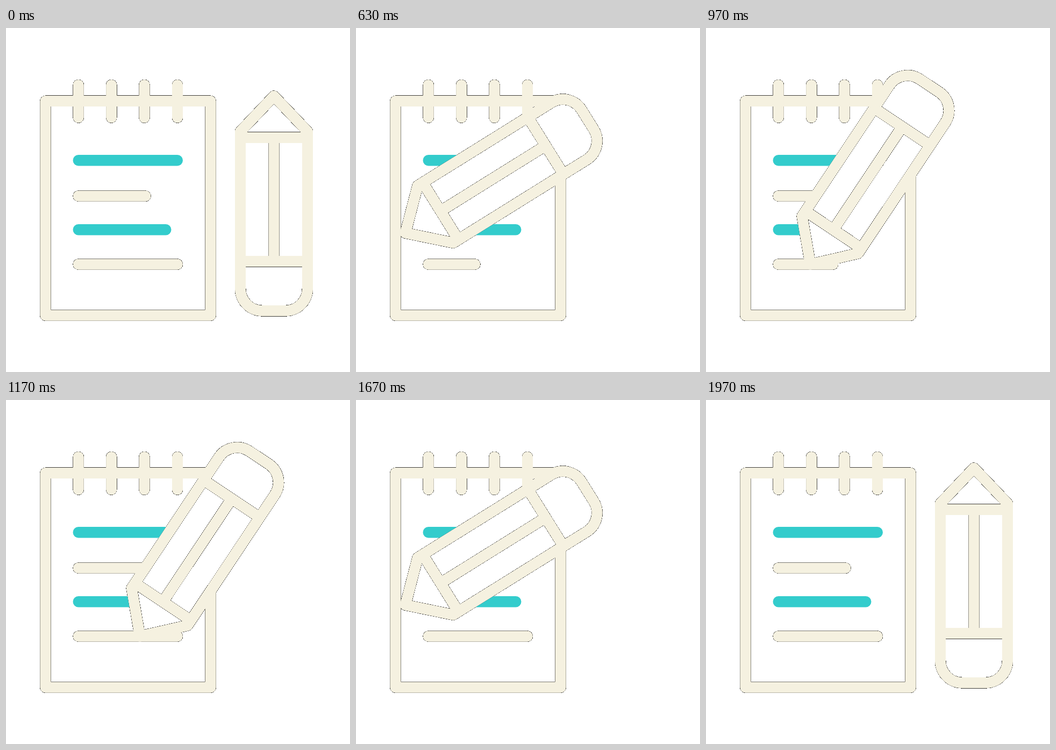
These frames come from a looping animation (640x640 px, 2.5 s). An HTML page:

```html
<!DOCTYPE html>
<html lang="en">
<head>
<meta charset="utf-8">
<title>Notepad and pencil</title>
<style>
  html, body { margin: 0; width: 100%; height: 100%; overflow: hidden; background: #fff; }
  svg { display: block; width: 100vw; height: 100vh; }
</style>
</head>
<body>
<svg viewBox="0 0 640 640" fill="none" stroke-width="20.2" stroke-linecap="round" stroke-linejoin="round">
  <defs>
    <path id="body" d="M-62.5-134 0-199.8 62.5-134V158.6A41 41 0 0 1 21.5 199.6H-21.5A41 41 0 0 1-62.5 158.6Z"/>
    <mask id="behind" maskUnits="userSpaceOnUse" x="0" y="0" width="640" height="640">
      <rect width="640" height="640" fill="#fff"/>
      <use class="pose" href="#body" fill="#000"/>
    </mask>
    <mask id="outside" maskUnits="userSpaceOnUse" x="0" y="0" width="640" height="640">
      <rect width="640" height="640" fill="#fff"/>
      <use class="pose" href="#body" fill="#000" stroke="#000"/>
    </mask>
    <!-- partly covered edge pixels are shown solid, blended with black -->
    <filter id="rim" filterUnits="userSpaceOnUse" x="0" y="0" width="640" height="640" color-interpolation-filters="sRGB">
      <feFlood flood-color="#000" result="black"/>
      <feMerge result="blended">
        <feMergeNode in="black"/>
        <feMergeNode in="SourceGraphic"/>
      </feMerge>
      <feComponentTransfer in="SourceAlpha" result="shape">
        <feFuncA type="discrete" tableValues="0 1 1 1 1 1 1 1"/>
      </feComponentTransfer>
      <feComposite in="blended" in2="shape" operator="in"/>
    </filter>
  </defs>

  <g stroke="#f5f1e0" filter="url(#rim)">
    <g mask="url(#behind)">
      <path d="M73.45 135.9H380.6V534.7H73.45Z"/>
      <path d="M134.7 106V166.5M196.2 106V166.5M257.5 106V166.5M319 106V166.5"/>
      <path d="M134.7 312.7H259.5"/>
      <path id="written"/>
    </g>
    <g class="pose">
      <use href="#body"/>
      <path d="M-62.5-122.7H62.5M-62.5 107.6H62.5M0-122.7V107.6" stroke-linecap="butt"/>
    </g>
  </g>
  <path d="M134.7 246.2H318.8M134.7 375.2H297.3" stroke="#33cccc" stroke-width="20.4" mask="url(#outside)"/>
</svg>
<script>
  const LOOP = 2500;
  const REST = { x: 498.5, y: 326.5 };
  const WRITE = { left: 214, right: 366, y: 273.3, angle: -146.3 };
  const LINE = { x: 134.7, y: 439.7, length: 184.1 };

  // moments in steps of 1/30 s
  const LIFT = 9, TOUCH = 21, TURN = 36, LEAVE = 48.2, LAND = 59;
  const ERASE = 12.5, EMPTY = 25, FULL = 32.5;

  const written = document.getElementById('written');
  const posed = document.querySelectorAll('.pose');

  const progress = (t, from, to) => Math.min(1, Math.max(0, (t - from) / (to - from)));
  const mix = (a, b, p) => a + (b - a) * p;
  const ease = p => p * p * (3 - 2 * p);

  function poseAt(step) {
    // 0 at rest, 1 on the page
    const swing = progress(step, LIFT, TOUCH) - progress(step, LEAVE, LAND);
    // the turn is even; the sideways path starts late, the rise ends early
    const across = swing - swing * (1 - swing) ** 4 / 3;
    const rise = swing + 1.25 * swing ** 3 * (1 - swing);

    const stroke = step < TURN
      ? 1 - (1 - progress(step, TOUCH, TURN)) ** 1.2
      : 1 - progress(step, TURN, LEAVE) ** 1.6;

    return {
      x: mix(REST.x, mix(WRITE.left, WRITE.right, stroke), across),
      y: mix(REST.y, WRITE.y, rise),
      angle: WRITE.angle * swing
    };
  }

  function draw(ms) {
    // whole steps, each starting on a hundredth of a second
    const step = Math.floor((Math.floor(ms / 10) * 3 + 1) / 10);
    const { x, y, angle } = poseAt(step);
    for (const el of posed) el.setAttribute('transform', `translate(${x} ${y}) rotate(${angle})`);

    const shown = 1 - ease(progress(step, ERASE, EMPTY)) + ease(progress(step, EMPTY, FULL));
    written.setAttribute('d', shown > 0 ? `M${LINE.x} ${LINE.y}h${LINE.length * shown}` : '');
  }

  const start = performance.now();
  function tick() {
    draw((performance.now() - start) % LOOP);
    requestAnimationFrame(tick);
  }
  draw(0);
  requestAnimationFrame(tick);
</script>
</body>
</html>
```
